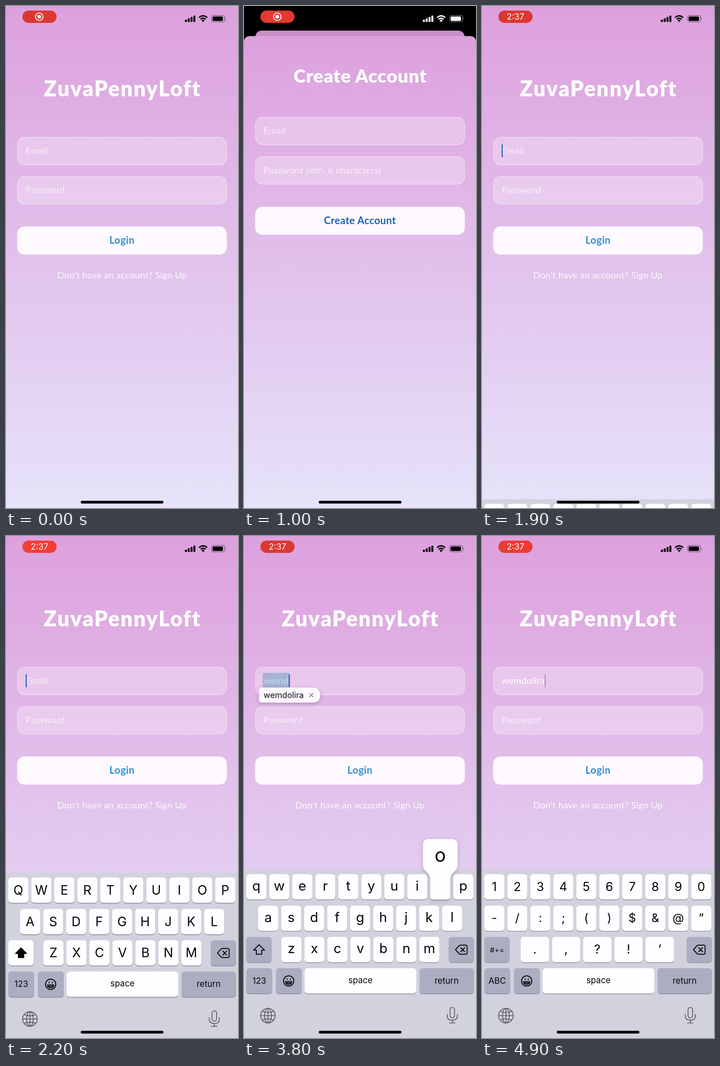
Write an HTML page that moves like this. It is 509 by 1100 pixels and loops after 5 s.

```html
<!DOCTYPE html>
<html lang="en">
<head>
<meta charset="utf-8">
<title>Login flow</title>
<style>
  html, body { margin: 0; width: 100%; height: 100%; overflow: hidden; background: #000; }
  svg { display: block; width: 100%; height: 100%; }
  text { white-space: pre; }
  .app { font-family: Lato, "Open Sans", sans-serif; fill: #fff; }
  .title { font-weight: 900; text-anchor: middle; }
  .field { font-size: 20px; letter-spacing: .3px; }
  .hint { fill-opacity: .68; }
  .button { font-size: 22px; font-weight: 700; letter-spacing: .5px; text-anchor: middle; }
  .link { font-size: 20px; letter-spacing: .2px; text-anchor: middle; fill-opacity: .9; }
  .sys { font-family: Inter, Roboto, sans-serif; }
  .keys text { text-anchor: middle; fill: #050505; }
  .line { fill: none; stroke: #050505; stroke-width: 2; stroke-linecap: round; stroke-linejoin: round; }
  .thin { fill: none; stroke: #55565f; stroke-width: 1.7; stroke-linecap: round; }
</style>
</head>
<body>
<svg id="stage" viewBox="0 0 509 1100" preserveAspectRatio="none"></svg>
<script>
const LOOP = 5000, STEP = 100, W = 509, H = 1100, SHEET_TOP = 66, KEYBOARD_HEIGHT = 369;
const USER = 'wemdolira';
const PRESSES = [2650, 2950, 3250, 3500, 3760, 3930, 4060, 4180, 4290];
const HOLD = 110;
const SHIFT_OFF = 2550, TO_NUMBERS = 4650, FOCUS = 1880;
const PRESENT = 109, DISMISS = 1369;
const PITCH = 50.45, KEY_W = 44, KEY_H = 55.5;
const ROW_Y = [741, 810, 878.5, 947];

const clamp = v => Math.min(1, Math.max(0, v));
const ramp = (t, from, to) => clamp((t - from) / (to - from));
// Critically damped spring, 0 to 1
const spring = ms => {
  if (ms <= 0) return 0;
  const x = ms * .018257;
  return 1 - (1 + x) * Math.exp(-x);
};

const rect = (x, y, w, h, r, attrs) =>
  `<rect x="${x}" y="${y}" width="${w}" height="${h}" rx="${r}" ${attrs}/>`;
const text = (x, y, str, attrs) => `<text x="${x}" y="${y}" ${attrs}>${str.replace('&', '&amp;')}</text>`;

const box = y => rect(25.2, y + .5, 459, 60.5, 16, 'fill="#fff" fill-opacity=".27" stroke="#fff" stroke-opacity=".42" stroke-width="1.4"');
const input = (y, hint, id = '') => box(y) + text(43, y + 37, hint, `class="field hint" ${id}`);
const button = (y, label, color) =>
  rect(24.5, y, 460, 61.5, 16, 'fill="#fdf9fe"') + text(254.5, y + 38, label, `class="button" fill="${color}"`);

const login =
  rect(0, 0, W, H, 0, 'fill="url(#sky)"') +
  text(255.5, 198, 'ZuvaPennyLoft', 'class="title" font-size="46.5" letter-spacing="2.1"') +
  input(287, 'Email', 'id="emailHint"') + input(373, 'Password') +
  button(483.3, 'Login', '#318fca') +
  text(254.5, 596.5, "Don't have an account? Sign Up", 'class="link"');

const signUp =
  `<path d="M0 1100V13.6Q0 0 13.6 0H495.4Q509 0 509 13.6V1100Z" fill="url(#sheetSky)"/>` +
  text(255, 102, 'Create Account', 'class="title" font-size="40.5" letter-spacing=".8"') +
  input(177.3, 'Email') + input(263.5, 'Password (min. 6 characters)') +
  button(373.8, 'Create Account', '#1a61b6');

// Keyboard
const key = (x, y, w, fill = '#fefdff') =>
  rect(x, y + 1.6, w, KEY_H, 6.8, 'fill="#8f909c"') + rect(x, y, w, KEY_H, 6.8, `fill="${fill}"`);
const DARK = '#abaec1';
const charKey = (x, y, w, ch, size, base) =>
  key(x, y, w) + text(x + w / 2, y + base, ch, `font-size="${size}"`);
const charRow = (chars, row, x0, size, base) =>
  [...chars].map((ch, i) => charKey(x0 + i * PITCH, ROW_Y[row], KEY_W, ch, size, base)).join('');

const LETTERS = ['qwertyuiop', 'asdfghjkl', 'zxcvbnm'];
const ROW_X = [5, 31, 82];
const letterKeys = upper => LETTERS.map((row, i) =>
  charRow(upper ? row.toUpperCase() : row, i, ROW_X[i], upper ? 28 : 29.5, upper ? 37.5 : 35.5)).join('');
const shiftKey = on => key(5, ROW_Y[2], 55.5, on ? '#fefdff' : DARK) +
  `<path class="line" transform="translate(33 906.5)" ${on ? 'style="fill:#050505"' : ''}
    d="M0 -11L12 1H6V10H-6V1H-12Z"/>`;
const modeKey = label => text(33.5, ROW_Y[3] + 34, label, 'font-size="18.5"');

const numberKeys = charRow('1234567890', 0, 5, 27, 37) + charRow('-/:;()$&@”', 1, 5, 26, 36) +
  [...'.,?!’'].map((ch, i) => charKey(85 + i * 68.5, ROW_Y[2], 62, ch, 27, 36)).join('') +
  key(5, ROW_Y[2], 55.5, DARK) + text(33, ROW_Y[2] + 34, '#+=', 'font-size="16"') + modeKey('ABC');

const keyboard =
  rect(0, 731, W, 400, 0, 'fill="#d2d2de"') +
  key(449, ROW_Y[2], 55.5, DARK) + key(5, ROW_Y[3], 57, DARK) + key(70, ROW_Y[3], 57, DARK) +
  key(133, ROW_Y[3], 245) + key(385, ROW_Y[3], 119.5, DARK) +
  text(255.5, 980, 'space', 'font-size="18.5"') + text(444.5, 981, 'return', 'font-size="18.5"') +
  `<path class="line" transform="translate(477 906.5)"
    d="M-13 0L-5.5 -8.5Q-4 -10 -2 -10H9Q12.5 -10 12.5 -6.5V6.5Q12.5 10 9 10H-2Q-4 10 -5.5 8.5ZM-1.5 -4.5L7 4.5M7 -4.5L-1.5 4.5"/>
  <g class="line" transform="translate(98 975)"><circle r="11.3"/>
    <path d="M-7 1.5H7Q6 7.5 0 7.5Q-6 7.5 -7 1.5ZM-3.5 -4.5V-3M3.5 -4.5V-3M-5 4.5H5"/></g>
  <g class="thin" transform="translate(52.5 1051)"><circle r="16"/><ellipse rx="7.5" ry="16"/>
    <path d="M-16 0H16M0 -16V16M-12.5 -9.5Q0 -4 12.5 -9.5M-12.5 9.5Q0 4 12.5 9.5"/></g>
  <g class="thin" transform="translate(457 1050)"><rect x="-5" y="-17" width="10" height="23" rx="5"/>
    <path d="M-11 -2V2Q-11 11 0 11Q11 11 11 2V-2M0 11V17M-6 17H6"/></g>` +
  `<g id="upper">${letterKeys(true)}${shiftKey(true)}${modeKey('123')}</g>
   <g id="lower">${letterKeys(false)}${shiftKey(false)}${modeKey('123')}</g>
   <g id="numbers">${numberKeys}</g>
   <g id="popup" filter="url(#soft)"><path fill="#fefdff"
     d="M-3 -77H47Q60 -77 60 -64V-20Q60 -12 54 -7Q44 1 44 10V49Q44 55.5 37 55.5H7Q0 55.5 0 49V10Q0 1 -10 -7Q-16 -12 -16 -20V-64Q-16 -77 -3 -77Z"/>
     <text id="popupChar" x="22" y="-27" font-size="41"></text></g>`;

const entry =
  rect(41, 300, 0, 32, 0, 'id="mark" fill="#a7b3d3"') +
  text(43, 324, '', 'id="typed" class="field"') +
  rect(43, 303, 2.6, 28.5, 1, 'id="caret" fill="#2c66c0"') +
  `<g id="suggestion" class="sys"><path filter="url(#soft)" fill="#fcf8fe"
     d="M40 332H150Q167 332 167 348.5Q167 365 150 365H40Q33 365 33 358V339Q33 332 40 332Z"/>
   ${text(43, 355, USER, 'font-size="18" fill="#111"')}
   <path d="M143.5 344.5L152 353M152 344.5L143.5 353" stroke="#77737c" stroke-width="1.6"/></g>`;

const statusBar =
  `<g id="status" fill="currentColor">
    ${[5, 8, 11, 14].map((h, i) => rect(392.5 + i * 6.2, 35 - h, 4.3, h, 1.2, '')).join('')}
    <g fill="none" stroke="currentColor" stroke-width="2.9">
      <path d="M423.5 25.3Q432.5 17.5 441.5 25.3M426.9 29Q432.5 24.3 438.1 29"/></g>
    <path d="M429 31.5Q432.5 28.7 436 31.5L432.5 35.2Z"/>
    ${rect(451.2, 20.7, 28.6, 14.2, 4.3, 'fill="none" stroke="currentColor" stroke-opacity=".45" stroke-width="1.4"')}
    ${rect(453.4, 22.9, 22.6, 9.8, 2.5, '')}
    <path d="M481.3 25.3Q483.4 27.8 481.3 30.3Z" fill-opacity=".5"/>
  </g>` +
  rect(36, 10, 75, 27, 13.5, 'id="pill"') +
  `<g id="recording" fill="none" stroke="#fff"><circle cx="73" cy="23.5" r="8.4" stroke-width="1.9"/>
    <circle cx="73" cy="23.5" r="4.1" fill="#fff" stroke="none"/></g>` +
  text(73.5, 30, '2:37', 'id="clock" class="sys" font-size="18.5" fill="#fff" text-anchor="middle"');

const gradient = (id, y2) => `<linearGradient id="${id}" gradientUnits="userSpaceOnUse" x1="0" y1="0" x2="0" y2="${y2}">
  <stop stop-color="#dda0dd"/><stop offset="1" stop-color="#e6e3fa"/></linearGradient>`;

document.getElementById('stage').innerHTML =
  `<defs>${gradient('sky', H)}${gradient('sheetSky', H - SHEET_TOP)}
    <clipPath id="cardClip">${rect(0, 0, W, H, 0, 'id="cardShape"')}</clipPath>
    <filter id="soft" x="-30%" y="-30%" width="160%" height="170%">
      <feDropShadow dx="0" dy="3" stdDeviation="5" flood-color="#403050" flood-opacity=".28"/></filter></defs>
  ${rect(0, 0, W, H, 0, 'fill="#000"')}
  <g id="card"><g class="app" clip-path="url(#cardClip)">${login}${entry}
    ${rect(0, 0, W, H, 0, 'id="dim" fill="#000"')}</g></g>
  <g id="sheet" class="app">${signUp}</g>
  <g id="keyboard" class="sys keys">${keyboard}</g>
  ${statusBar}
  ${rect(164, 1084.3, 181.5, 6, 3, 'fill="#000"')}`;

const el = {};
document.querySelectorAll('#stage [id]').forEach(node => el[node.id] = node);
const set = (id, attrs) => { for (const name in attrs) el[id].setAttribute(name, attrs[name]); };
const show = (id, on) => set(id, { display: on ? 'inline' : 'none' });

function drawSheet(t) {
  let p = t < DISMISS ? spring(t - PRESENT) : 1 - spring(t - DISMISS);
  if (p < .002) p = 0;
  const scale = 1 - .098 * p;
  set('card', { transform: `translate(${W * (1 - scale) / 2} ${54 * p}) scale(${scale})` });
  set('cardShape', { rx: p ? (53 - 39.4 * p) / scale : 0 });
  set('dim', { 'fill-opacity': .1 * p });
  set('sheet', { transform: `translate(0 ${H - (H - SHEET_TOP) * p})` });
  show('sheet', p > 0);
}

function drawStatus(t) {
  const pulse = Math.cos((t - 300) / 950 * 2 * Math.PI);
  set('pill', { fill: `rgb(${227 + 17 * pulse},${57 + 4 * pulse},${50 + 3 * pulse})` });
  show('recording', t < 1300);
  show('clock', t >= 1300);
  const light = 255 * (ramp(t, 120, 460) - ramp(t, 1330, 1480));
  el.status.style.color = `rgb(${light},${light},${light})`;
}

function drawKeyboard(t) {
  const up = spring(t - FOCUS);
  show('keyboard', up > 0);
  set('keyboard', { transform: `translate(0 ${KEYBOARD_HEIGHT * (1 - up)})` });
  show('upper', t < SHIFT_OFF);
  show('lower', t >= SHIFT_OFF && t < TO_NUMBERS);
  show('numbers', t >= TO_NUMBERS);

  const pressed = PRESSES.findIndex(at => t >= at && t < at + HOLD);
  show('popup', pressed >= 0);
  if (pressed < 0) return;
  const ch = USER[pressed];
  const row = LETTERS.findIndex(letters => letters.includes(ch));
  el.popupChar.textContent = ch;
  set('popup', { transform: `translate(${ROW_X[row] + LETTERS[row].indexOf(ch) * PITCH} ${ROW_Y[row]})` });
}

function drawEntry(t) {
  const count = PRESSES.filter(at => t >= at + HOLD).length;
  const suggesting = count >= 4 && count < USER.length;
  el.typed.textContent = USER.slice(0, count);
  const width = count ? el.typed.getComputedTextLength() : 0;
  show('emailHint', !count);
  show('suggestion', suggesting);
  show('mark', suggesting);
  set('mark', { width: width + 3.5 });
  el.typed.style.fill = suggesting ? '#c3dcef' : '#fff';

  const idle = (t - (count ? PRESSES[count - 1] + HOLD : FOCUS)) % 1000;
  const alpha = 1 - ramp(idle, 430, 550) + ramp(idle, 850, 970);
  show('caret', t >= FOCUS);
  set('caret', { x: 43 + width, 'fill-opacity': alpha });
}

const start = performance.now();
function frame() {
  const elapsed = performance.now() - start + 5;
  const t = Math.floor(elapsed / STEP) * STEP % LOOP;
  drawSheet(t);
  drawStatus(t);
  drawKeyboard(t);
  drawEntry(t);
  requestAnimationFrame(frame);
}
frame();
</script>
</body>
</html>
```
